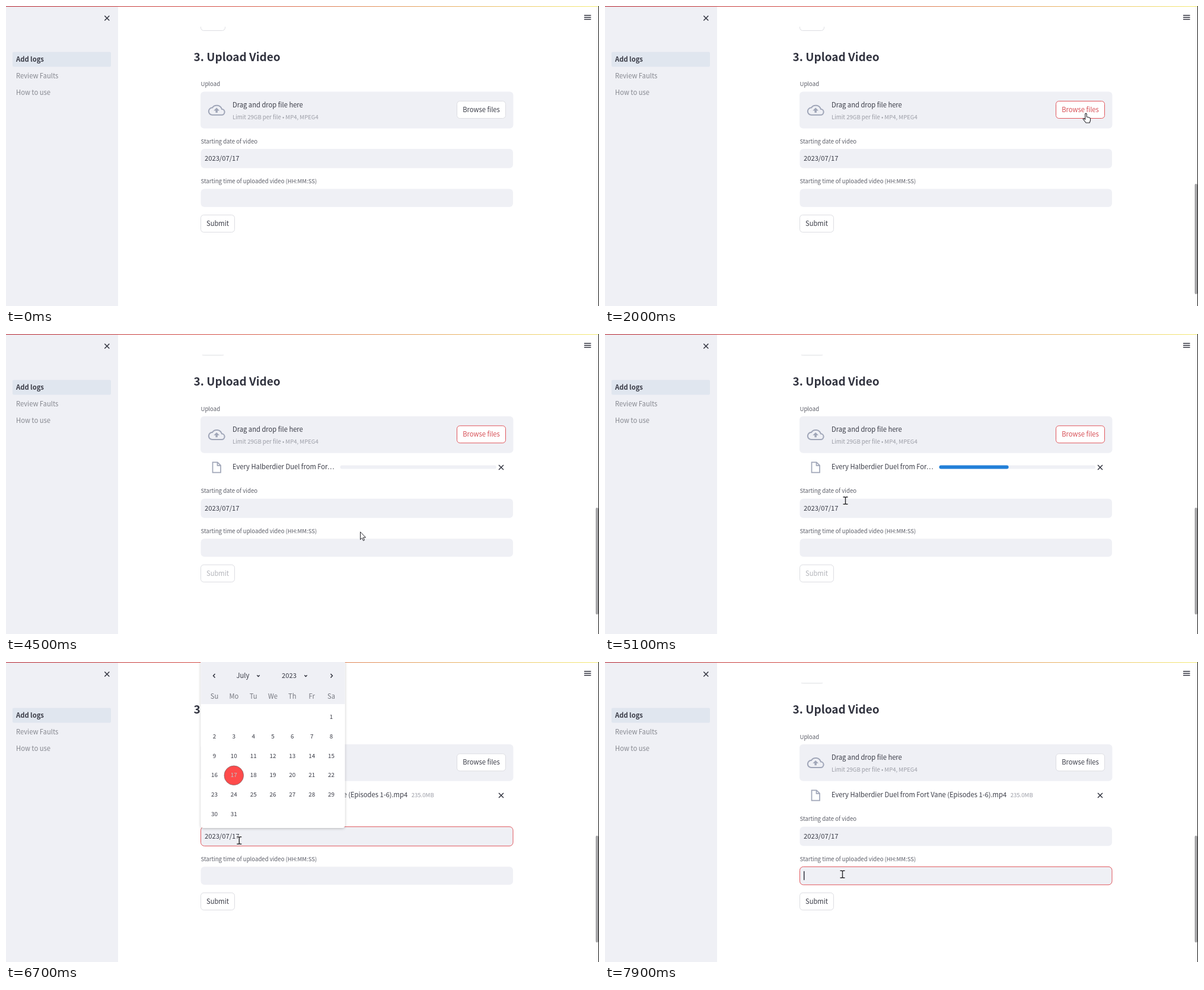
Write an HTML page that moves like this. It is 1000 px wide and 506 px high and loops after 8 s.

```html
<!DOCTYPE html>
<html lang="en">
<head>
<meta charset="utf-8">
<title>Upload video form</title>
<style>
  html, body { margin: 0; width: 100%; height: 100%; overflow: hidden; background: #fff; }
  svg { display: block; width: 100vw; height: 100vh; }
  text { font: 11.2px "Noto Sans CJK JP", "Noto Sans CJK SC", "Noto Sans CJK", "Noto Sans", sans-serif; fill: #3a3c47; white-space: pre; }
  .small { font-size: 9.6px; fill: #5c5e68; }
  .faint { font-size: 9.6px; fill: #9b9da6; }
  .nav { fill: #85878f; }
  .bold { font-weight: 700; }
  .title { font-size: 19px; font-weight: 700; fill: #31333f; }
  .mid { text-anchor: middle; }
  .day { font-size: 9.9px; text-anchor: middle; }
  .panel { fill: #eff0f5; }
  .button { fill: #fff; stroke: #dcdde2; }
  .line { fill: none; stroke: #31333f; stroke-width: 1.5; }
  .icon { fill: none; stroke: #a0a6b8; stroke-width: 1.7; }
</style>
</head>
<body>
<svg viewBox="0 0 1000 506" preserveAspectRatio="none">
  <defs>
    <linearGradient id="rainbow">
      <stop offset="0" stop-color="#bd3f49"/>
      <stop offset=".35" stop-color="#d9635c"/>
      <stop offset="1" stop-color="#f5ee86"/>
    </linearGradient>
    <clipPath id="belowHeader"><path d="M189 35h811v471H189z"/></clipPath>
    <filter id="shadow" x="-10%" y="-10%" width="120%" height="120%">
      <feDropShadow dx="0" dy="1" stdDeviation="2" flood-opacity=".25"/>
    </filter>
    <path id="cross" class="line" d="M-4-4l8 8m0-8l-8 8"/>
  </defs>

  <rect class="panel" width="189" height="506"/>
  <rect x="11" y="77.5" width="166" height="25" rx="2" fill="#e0e6ef"/>
  <text x="17" y="93.8" class="bold">Add logs</text>
  <text x="17" y="121.8" class="nav">Review Faults</text>
  <text x="17" y="149.8" class="nav">How to use</text>
  <use href="#cross" x="170.3" y="20.5"/>
  <path class="line" stroke-width="1.3" d="M975 15.8h11.5m-11.5 3.4h11.5m-11.5 3.4h11.5"/>

  <g clip-path="url(#belowHeader)">
    <g id="upper">
      <rect class="button" x="328.5" y="13" width="41" height="28.5" rx="5"/>
      <text x="316.5" y="92.8" class="title">3. Upload Video</text>
      <text x="328.5" y="135.3" class="small">Upload</text>
      <rect class="panel" x="328" y="144.5" width="527.5" height="62" rx="6"/>
      <g transform="translate(340.6 160.7) scale(1.21)">
        <path class="icon" d="M6 19h13a4 4 0 0 0 .3-8a7.5 7.5 0 0 0-13.3-2a5 5 0 0 0 0 10z"/>
        <path fill="#a0a6b8" d="M8 13h2.6v3h2.8v-3H16l-4-4z"/>
      </g>
      <text x="382" y="170.8">Drag and drop file here</text>
      <text x="382" y="190.6" class="faint">Limit 29GB per file • MP4, MPEG4</text>
      <rect id="browse" class="button" x="760.5" y="160.5" width="82" height="29" rx="5"/>
      <text id="browseText" x="801.5" y="179" class="mid">Browse files</text>
    </g>

    <g id="file">
      <path class="icon" d="M348.5 216.3h8.2l5.3 5.3v12h-13.5zm8 0v5.5h5.5"/>
      <g id="loading">
        <text x="382" y="227.6">Every Halberdier Duel from For…</text>
        <path stroke="#eff0f5" stroke-width="6" stroke-linecap="round" d="M566.5 224.5H824"/>
        <rect id="bar" x="563.5" y="221.5" height="6" rx="3" fill="#2280d8"/>
      </g>
      <text id="loaded" x="382" y="227.6">Every Halberdier Duel from Fort Vane (Episodes 1-6).mp4<tspan dx="6.5" class="faint">235.0MB</tspan></text>
      <use href="#cross" x="835" y="225"/>
    </g>

    <g id="lower">
      <text x="328.5" y="231.6" class="small">Starting date of video</text>
      <rect id="dateField" class="panel" x="328.5" y="241" width="526.5" height="32.5" rx="6"/>
      <text x="335" y="261.4">2023/07/17</text>
      <text x="328.5" y="299.4" class="small">Starting time of uploaded video (HH:MM:SS)</text>
      <rect id="timeField" class="panel" x="328.5" y="308.5" width="526.5" height="30.5" rx="6"/>
      <rect class="button" x="328.5" y="352.5" width="57" height="29" rx="5"/>
      <text id="submit" x="357" y="370.8" class="mid">Submit</text>
      <path id="dateCaret" class="line" stroke-width="1" d="M394 250.5v13"/>
      <path id="timeCaret" class="line" stroke-width="1" d="M335.7 316v15"/>
    </g>
  </g>

  <rect width="1000" height="1.2" fill="url(#rainbow)"/>

  <g id="calendar">
    <path d="M328.5 0h243v275q0 5-5 5h-233q-5 0-5-5z" fill="#fff" filter="url(#shadow)"/>
    <path class="panel" d="M328.5 0h243v71h-243z"/>
    <path class="line" d="M352.5 20l-3 3.3 3 3.3M547.5 20l3 3.3-3 3.3"/>
    <path class="line" stroke-width="1.1" d="M423.3 22.3l2.2 2.2 2.2-2.2M503.3 22.3l2.2 2.2 2.2-2.2"/>
    <text x="388.5" y="27.2">July</text>
    <text x="465" y="27.2">2023</text>
    <circle cx="384.3" cy="191.3" r="16.3" fill="#ff4b4b" stroke="#806468" stroke-width=".8"/>
  </g>

  <rect id="scrollbar" x="994.5" width="4.5" rx="2" fill="#a3a3a5"/>
  <path d="M999.5 0v506" stroke="#111"/>

  <g id="cursor" stroke="#26262c" fill="#fff" stroke-linejoin="round">
    <path id="arrow" d="M0 0v13l3-2.8 2 4.6 2-.9-2-4.5h4z"/>
    <path id="hand" stroke-width="1.1" d="M-1.3 1q1.3-1.8 2.6 0v5l4.6 1.2q1.6.5 1.6 2v3l-1.4 3.8h-6l-4.8-6q-.4-1.5 1.2-1.4l2.2 1.8z"/>
    <g id="beam" fill="none">
      <path stroke="#fff" stroke-width="3.4" d="M-4-6h8M0-6v12M-4 6h8"/>
      <path stroke-width="1.5" d="M-4-6h3l1 1 1-1h3M0-6v12M-4 6h3l1-1 1 1h3"/>
    </g>
  </g>
</svg>
<script>
const $ = id => document.getElementById(id);
const show = (id, on) => $(id).style.display = on ? "" : "none";
const set = (id, attrs) => Object.assign($(id).style, attrs);
const RED = "#e0565c", LOOP = 8000;

function addLabel(content, column, y, className, fill) {
  const label = document.createElementNS("http://www.w3.org/2000/svg", "text");
  label.textContent = content;
  label.setAttribute("x", 351.5 + column * 32.83);
  label.setAttribute("y", y);
  label.setAttribute("class", className);
  if (fill) label.style.fill = fill;
  $("calendar").append(label);
}
["Su", "Mo", "Tu", "We", "Th", "Fr", "Sa"].forEach((name, i) => addLabel(name, i, 62.3, "mid", "#75777f"));
for (let day = 1; day <= 31; day++) {
  const cell = day + 5;
  addLabel(day, cell % 7, 96 + Math.floor(cell / 7) * 32.83, "day", day === 17 ? "#b9c9cc" : "");
}

// Pointer stops: time, x, y
const enter = [[200, 985, 390], [600, 890, 280], [1000, 806, 196], [1100, 808, 192], [1200, 810, 184], [1300, 811, 181]];
const fill = [[4400, 640, 345], [4800, 470, 300], [5100, 405.5, 281], [5800, 393, 301], [7300, 393.5, 301], [7600, 400.5, 358]];

function along(stops, t) {
  const next = stops.findIndex(stop => stop[0] > t);
  if (next < 0) return stops.at(-1).slice(1);
  const [a, b] = [stops[Math.max(next - 1, 0)], stops[next]];
  const k = Math.max(0, (t - a[0]) / (b[0] - a[0]));
  return [1, 2].map(i => a[i] + (b[i] - a[i]) * k);
}

function render(t) {
  const uploading = t >= 4400, done = t >= 6600;
  const hot = t >= 1200 && t < 6200, pressed = t >= 1800 && t < 2000;
  const picking = t >= 6300 && t < 7800;

  $("upper").setAttribute("transform", `translate(0 ${uploading ? -5.7 : 0})`);
  $("lower").setAttribute("transform", `translate(0 ${uploading ? 36.8 : 0})`);
  set("browse", { stroke: hot ? RED : "", fill: pressed ? "#ff4b4b" : "" });
  set("browseText", { fill: pressed ? "#fff" : hot ? "#d64d54" : "" });

  show("file", uploading);
  show("loading", !done);
  show("loaded", done);
  $("bar").setAttribute("width", 263.5 * Math.min(1, Math.max(0, (t - 4540) / 1260)));
  set("submit", { fill: uploading && t < 6700 ? "#b3b4ba" : "" });

  set("dateField", { stroke: picking ? RED : t >= 6200 && t < 6300 ? "#d6d2d8" : "none" });
  set("timeField", { stroke: t >= 7900 ? RED : t >= 7800 ? "#dcb9bf" : "none" });
  show("dateCaret", t >= 6200 && t < 6300);
  show("timeCaret", t >= 7900);
  show("calendar", picking);

  show("scrollbar", t >= 200);
  $("scrollbar").setAttribute("y", uploading ? 293 : 300);
  $("scrollbar").setAttribute("height", uploading ? 180 : 186);

  show("cursor", t >= 200 && t < 4000 || uploading);
  show("arrow", t < 1100 || uploading && t < 4800);
  show("hand", t >= 1100 && t < 4000);
  show("beam", t >= 4800);
  $("cursor").setAttribute("transform", `translate(${along(uploading ? fill : enter, t)})`);
}

const start = performance.now();
function tick() {
  const elapsed = (performance.now() - start) % LOOP;
  render(Math.floor(elapsed / 100) * 100);
  requestAnimationFrame(tick);
}
tick();
</script>
</body>
</html>
```
